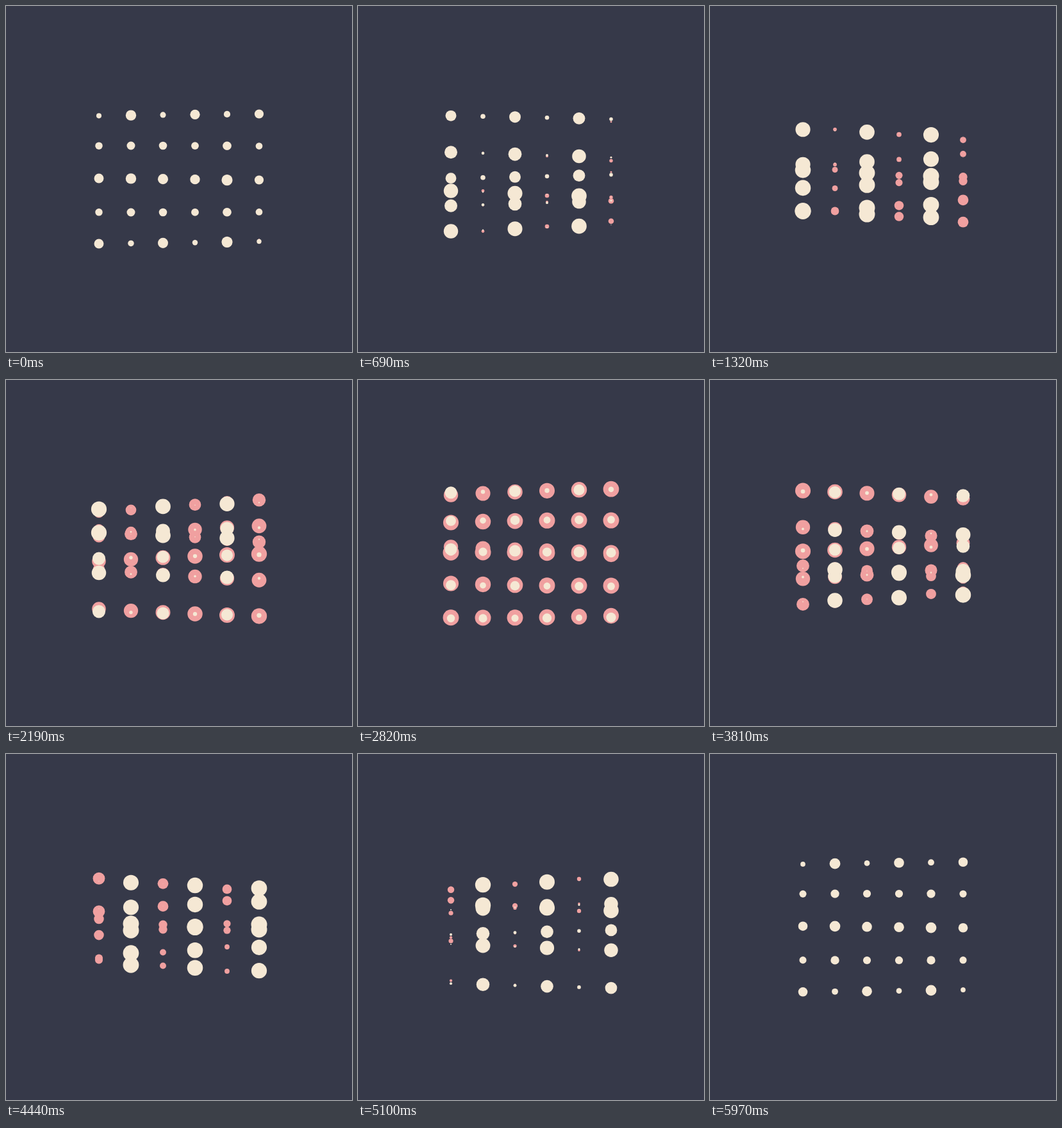
These frames come from a looping animation (540x540 px, 6000 ms). An HTML page with a canvas:

```html
<!DOCTYPE html>
<html lang="en">
<head>
<meta charset="utf-8">
<title>Dot waves</title>
<style>
  html, body { margin: 0; width: 100%; height: 100%; overflow: hidden; background: #363949; }
  canvas { display: block; width: 540px; height: 540px; }
</style>
</head>
<body>
<canvas id="stage" width="540" height="540"></canvas>
<script>
const ctx = document.getElementById('stage').getContext('2d');
const LOOP = 6000, STEP = 30;
const COLS = 6, ROWS = 3, GAP = 50, LEFT = 145, TOP = 220;
const HALF = 6.25; // half of the largest dot radius

const layers = [
  { color: '#f0a0a0', swing: 51, start: -0.467, colShift: 0.088, rowShift: 0.28,
    radius: a => HALF * (1 - Math.cos(a)) },
  { color: '#f5e8d4', swing: 52, start: -0.362, colShift: 0.0445, rowShift: 0.28,
    radius: (a, col) => HALF * (1 + (col % 2 ? -1 : 1) * Math.sin(a)) }
];

function dot(x, y, r) {
  ctx.beginPath();
  ctx.arc(x, y, r, 0, Math.PI * 2);
  ctx.fill();
}

function drawLayer(layer, turn) {
  ctx.fillStyle = layer.color;
  for (let row = 0; row < ROWS; row++) {
    for (let col = 0; col < COLS; col++) {
      const a = turn + layer.start + col * layer.colShift + row * layer.rowShift;
      const x = LEFT + col * GAP;
      const y = TOP + row * GAP;
      const dy = layer.swing * Math.cos(a);
      const r = layer.radius(a, col);
      dot(x, y - dy, r);
      dot(x, y + dy, r);
    }
  }
}

function draw(ms) {
  const t = Math.floor((ms % LOOP) / STEP) * STEP;
  ctx.fillStyle = '#363949';
  ctx.fillRect(0, 0, 540, 540);
  for (const layer of layers) drawLayer(layer, t / LOOP * Math.PI * 2);
}

const begin = performance.now();
function tick() {
  draw(performance.now() - begin);
  requestAnimationFrame(tick);
}
tick();
</script>
</body>
</html>
```
